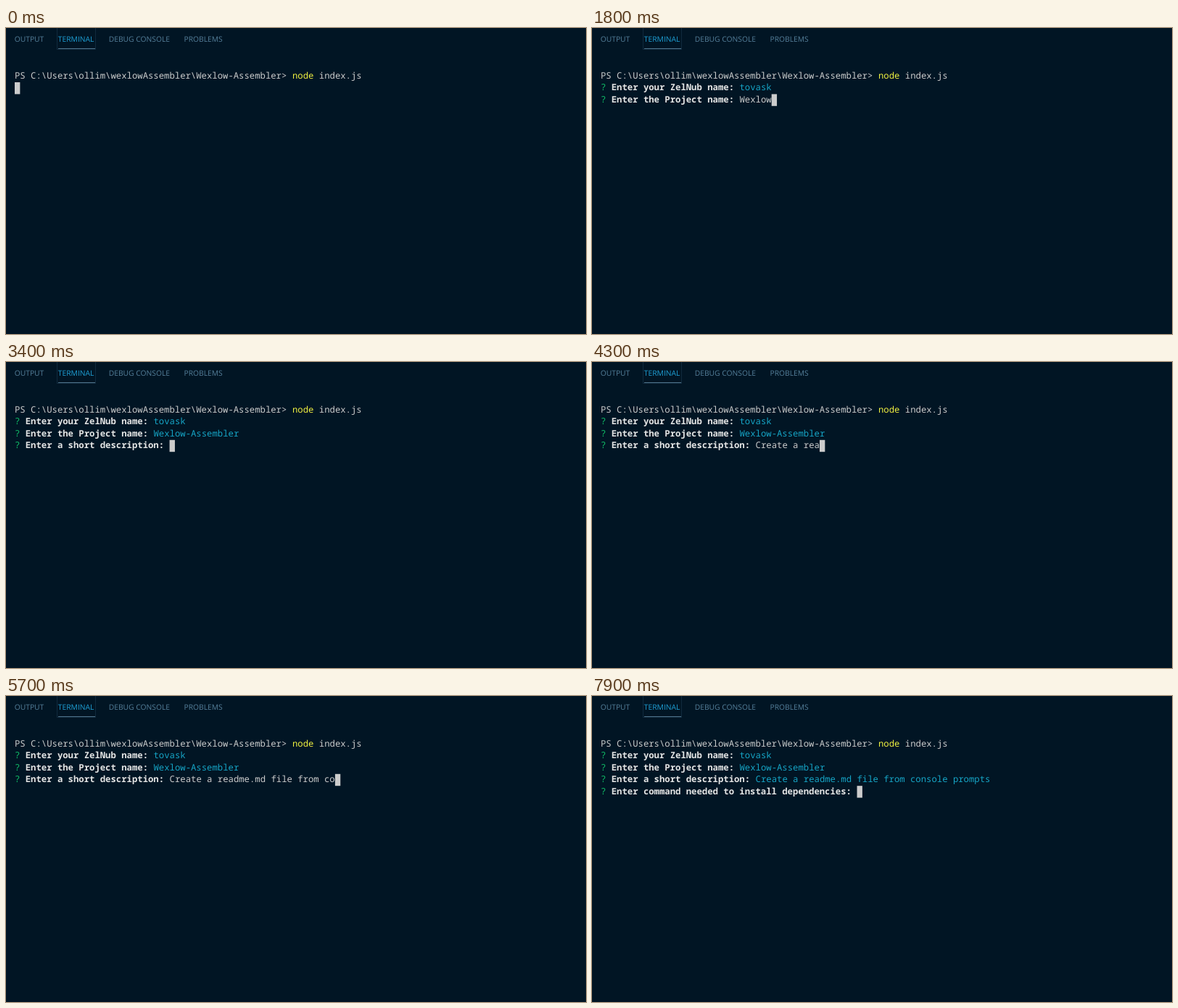
Recreate the animation shown at these times as an HTML page. Size 800 by 423 pixels, loop 8 s.

```html
<!DOCTYPE html>
<html lang="en">
<head>
<meta charset="utf-8">
<style>
  html, body { margin: 0; width: 100%; height: 100%; overflow: hidden; background: #011524; }
  svg { display: block; }
  text { white-space: pre; text-rendering: geometricPrecision; }
  .tab { font: 10.3px "Open Sans", "Noto Sans", sans-serif; fill: #56809b; }
  .active { fill: #1fa2d8; }
  #term { font: 500 12.275px "Noto Sans Mono", "DejaVu Sans Mono", monospace; fill: #cccccc; }
  #term .bold { font-weight: 700; fill: #e5e5e5; }
  #term .green { fill: #10c068; }
  #term .cyan { fill: #16a5c6; }
  #term .yellow { fill: #f0f040; }
</style>
</head>
<body>
<svg width="800" height="423" viewBox="0 0 800 423">
  <rect x="70.5" y="-.5" width="53" height="30" fill="none" stroke="#10293d"/>
  <rect x="72" y="28" width="51" height="1" fill="#51758c"/>
  <text class="tab" x="11.7" y="19.2">OUTPUT</text>
  <text class="tab active" x="71.8" y="19.2">TERMINAL</text>
  <text class="tab" x="141.7" y="19.2">DEBUG CONSOLE</text>
  <text class="tab" x="245.5" y="19.2">PROBLEMS</text>
  <g id="term"></g>
</svg>
<script>
const LOOP = 8000, STEP = 100;
const LEFT = 12, TOP = 58.6, CELL = 7.365, ROW = 16.4, BASELINE = 11.3;
const PATH = 'PS C:\\Users\\ollim\\wexlowAssembler\\Wexlow-Assembler> ';

// keys: [time, number of characters typed]
const questions = [
  { ask: 'Enter your ZelNub name:', answer: 'tovask',
    start: 100, enter: 1100, keys: [[300, 0], [900, 6]] },
  { ask: 'Enter the Project name:', answer: 'Wexlow-Assembler',
    start: 1100, enter: 2900, keys: [[1200, 0], [1800, 6], [2700, 16]] },
  { ask: 'Enter a short description:', answer: 'Create a readme.md file from console prompts',
    typo: 'Create a reamde', fixed: 4300, start: 2900, enter: 6700,
    keys: [[3400, 0], [4000, 15], [4100, 15], [4300, 12], [5100, 17],
           [5700, 31], [6000, 35], [6200, 41], [6400, 44]] },
  { ask: 'Enter command needed to install dependencies:', answer: '',
    start: 6700, enter: Infinity, keys: [[6700, 0]] },
];

const term = document.getElementById('term');

function typedCount(keys, t) {
  const next = keys.findIndex(key => key[0] > t);
  if (next < 0) return keys[keys.length - 1][1];
  if (next === 0) return 0;
  const [t0, n0] = keys[next - 1], [t1, n1] = keys[next];
  return Math.round(n0 + (n1 - n0) * (t - t0) / (t1 - t0));
}

const put = (row, col, str, style = '') =>
  `<text class="${style}" x="${LEFT + col * CELL}" y="${TOP + row * ROW + BASELINE}">${
    str.replace(/>/g, '&gt;')}</text>`;

function render(t) {
  let out = put(0, 0, PATH) + put(0, PATH.length, 'node', 'yellow')
          + put(0, PATH.length + 5, 'index.js');
  let cursorRow = 1, cursorCol = 0;
  questions.forEach((q, i) => {
    if (t < q.start) return;
    const row = i + 1, col = q.ask.length + 3, done = t >= q.enter;
    const source = t < q.fixed ? q.typo : q.answer;
    const typed = source.slice(0, typedCount(q.keys, t));
    out += put(row, 0, '?', 'green') + put(row, 2, q.ask, 'bold')
         + put(row, col, typed, done ? 'cyan' : '');
    cursorRow = row;
    cursorCol = col + typed.length;
  });
  term.innerHTML = out + `<rect x="${LEFT + cursorCol * CELL}" y="${TOP + cursorRow * ROW}"
    width="${CELL}" height="${ROW}"/>`;
}

let shown = -1;
function frame() {
  const t = Math.floor(performance.now() % LOOP / STEP) * STEP;
  if (t !== shown) render(shown = t);
  requestAnimationFrame(frame);
}
frame();
</script>
</body>
</html>
```
